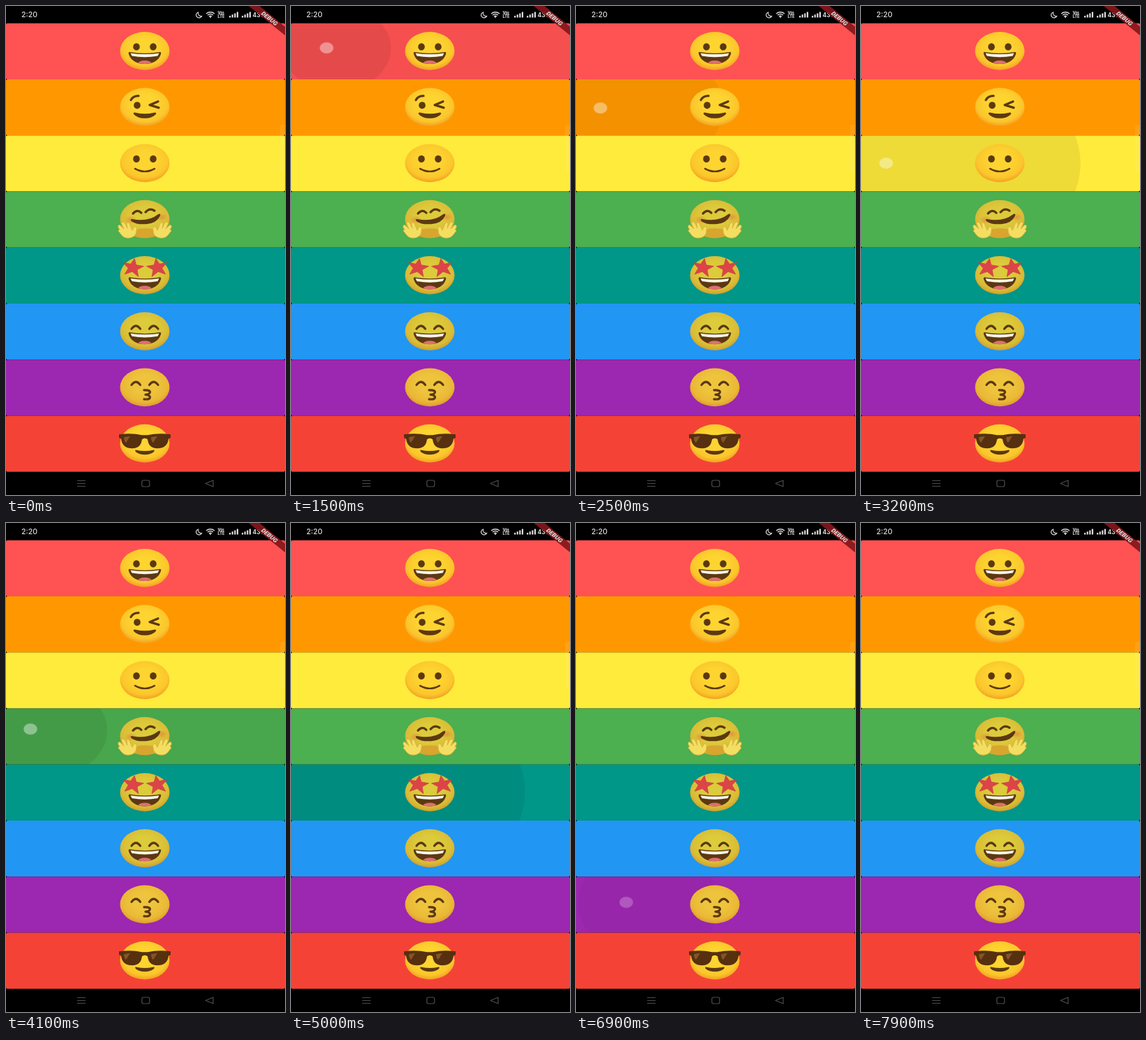
An HTML page that plays this animation: 400 by 700 pixels, repeating every 8000 ms.

```html
<!DOCTYPE html>
<html lang="en">
<head>
<meta charset="utf-8">
<title>Emoji buttons</title>
<style>
html, body { margin: 0; width: 100%; height: 100%; overflow: hidden; background: #000; }
svg { display: block; width: 100%; height: 100%; }
text { font-family: Inter, Roboto, sans-serif; fill: #dcdcdc; }
.line { fill: none; stroke: #5c3812; stroke-width: 3.2; stroke-linecap: round; stroke-linejoin: round; }
.dark { fill: #5c3812; }
.teeth { fill: #f8f4e6; }
.tongue { fill: #dd6f72; }
.nav { fill: none; stroke: #4c4c4c; stroke-width: 1.2; stroke-linejoin: round; }
</style>
</head>
<body>
<svg viewBox="0 0 400 700" preserveAspectRatio="none">
  <defs>
    <radialGradient id="warm" cx=".5" cy=".42" r=".58">
      <stop offset=".4" stop-color="#fdd430"/><stop offset=".8" stop-color="#fbc62c"/><stop offset="1" stop-color="#f2a023"/>
    </radialGradient>
    <radialGradient id="olive" cx=".5" cy=".42" r=".58">
      <stop offset=".4" stop-color="#dccb3b"/><stop offset=".8" stop-color="#dabc36"/><stop offset="1" stop-color="#d0a02c"/>
    </radialGradient>
    <radialGradient id="gold" cx=".5" cy=".42" r=".58">
      <stop offset=".4" stop-color="#eec43d"/><stop offset=".8" stop-color="#eab836"/><stop offset="1" stop-color="#de9c30"/>
    </radialGradient>
    <radialGradient id="blush">
      <stop offset="0" stop-color="#e5813f" stop-opacity=".7"/><stop offset="1" stop-color="#e5813f" stop-opacity="0"/>
    </radialGradient>
    <path id="eyes" class="line" d="M-19 -3.5Q-12.5 -12 -6.5 -3.5M6.5 -3.5Q12.5 -12 19 -3.5"/>
    <g id="dots" class="dark"><ellipse cx="-12" cy="-6" rx="4.8" ry="5.2"/><ellipse cx="12" cy="-6" rx="4.8" ry="5.2"/></g>
    <clipPath id="mouthClip"><path d="M-21 1.5Q0 5 21 1.5Q24 1 23 4.5C20 14 11 18.5 0 18.5S-20 14 -23 4.5Q-24 1 -21 1.5Z"/></clipPath>
    <g id="grin" clip-path="url(#mouthClip)">
      <rect class="dark" x="-25" width="50" height="20"/>
      <path class="teeth" d="M-20.5 3Q0 6 20.5 3L18.5 7Q0 10.5 -18.5 7Z"/>
      <ellipse class="tongue" cy="17.5" rx="9.5" ry="3.8"/>
    </g>
    <path id="star" fill="#dc4448" stroke="#c43a42" stroke-width=".6" stroke-linejoin="round"
      d="M0 -13L4 -4.5L15 -4.5L6.5 2L10 11.5L0 6L-10 11.5L-6.5 2L-15 -4.5L-4 -4.5Z"/>
    <path id="hand" fill="#f3de62" stroke="#d9b03a" stroke-width=".8" stroke-linejoin="round"
      d="M-38 12C-39 8 -36 7 -34 10L-30 14L-33 7C-34 3 -30 3 -28 7L-25 13L-26 7C-25 3 -22 5 -21 9L-18 16L-16 12C-13 9 -11 12 -12 16C-12 23 -17 27 -24 27C-31 27 -34 22 -36 19C-39 17 -38 15 -36 15Z"/>
  </defs>

  <g id="rows"></g>
  <g id="ink"></g>
  <g id="faces">
    <g data-skin="warm"><use href="#dots"/><use href="#grin"/></g>
    <g data-skin="warm">
      <path class="line" d="M-20 -10Q-17 -16 -9 -16"/>
      <ellipse class="dark" cx="-11" cy="-2.5" rx="4.8" ry="5"/>
      <path class="line" d="M19 -8L7 -3L20 1"/>
      <path class="dark" d="M-13 8Q0 11 13 8Q17 7 16 10Q11 16 0 16T-16 10Q-17 7 -13 8Z"/>
    </g>
    <g data-skin="warm"><use href="#dots"/><path class="line" style="stroke-width:2.4" d="M-14 8Q0 16 14 8"/></g>
    <g data-skin="olive">
      <ellipse cx="-20" cy="1" rx="9" ry="6" fill="url(#blush)"/><ellipse cx="24" cy="-3" rx="9" ry="6" fill="url(#blush)"/>
      <path class="line" d="M-17 -8Q-11 -15 -5 -9M1 -10Q7 -17 14 -12"/>
      <path class="dark" d="M-17 0Q5 4 19 -7Q23 -9 22 -5Q17 6 2 7Q-12 8 -19 3Q-22 -1 -17 0Z"/>
      <path fill="#d8a52e" d="M-15 15Q0 11 15 15L12 25Q0 28 -12 25Z"/>
      <use href="#hand"/><use href="#hand" transform="scale(-1 1)"/>
    </g>
    <g data-skin="olive">
      <use href="#grin" y="1.5"/>
      <use href="#star" transform="translate(-17 -11) rotate(10)"/><use href="#star" transform="translate(18 -11) rotate(-10)"/>
    </g>
    <g data-skin="olive"><use href="#eyes"/><use href="#grin"/></g>
    <g data-skin="gold"><use href="#eyes"/><path class="line" d="M-1 4C10 3 10 10 1 10.5C10 11 10 18 -1 17"/></g>
    <g data-skin="warm">
      <path fill="#56300f" d="M-37 -13Q-18 -15 -4 -12H4Q18 -15 37 -13V-8L34 -7C33 3 27 7 18 7C9 7 5 2 4 -6Q0 -9 -4 -6C-5 2 -9 7 -18 7C-27 7 -33 3 -34 -7L-37 -8Z"/>
      <path fill="#84552b" d="M-30 -9L-21 -10.5L-27 -1Q-30 -4 -30 -9ZM9 -9L18 -10.5L12 -1Q9 -4 9 -9Z"/>
      <path class="dark" d="M-12 9.5Q0 12 12 9.5Q15 9 13 12Q8 16 0 16T-13 12Q-15 9 -12 9.5Z"/>
    </g>
  </g>
  <ellipse id="touch" rx="9.6" ry="7.8" fill="#fff" stroke="#fff" stroke-opacity=".3" stroke-width="1.5"/>
  <path d="M400 170H396Q393 170 393 174V233Q393 237 396 237H400Z" fill="#fff" opacity=".08"/>

  <text x="22" y="16" font-size="10.6" font-weight="500">2:20</text>
  <g fill="#dcdcdc">
    <path d="M275.5 9A4.2 4 0 1 0 280.5 14.6A4.5 4.4 0 0 1 275.5 9Z" fill="none" stroke="#dcdcdc" stroke-width="1.2"/>
    <path d="M287 11Q293 6.5 299 11M289 13Q293 10 297 13M291 15Q293 13.5 295 15" fill="none" stroke="#dcdcdc" stroke-width="1.5"/>
    <circle cx="293" cy="16" r="1"/>
    <text x="303.5" y="12" font-size="5.6" font-weight="800">Vo)</text>
    <text x="303.5" y="17" font-size="5.6" font-weight="800">LTE</text>
    <path id="bars" d="M320 14h2.2v2.5h-2.2zM323.6 12.3h2.2v4.2h-2.2zM327.2 10.4h2.2v6.1h-2.2zM330.8 8.5h2.2v8h-2.2z"/>
    <use href="#bars" x="18"/>
    <text x="353.5" y="15.6" font-size="8.4" font-weight="700">43%</text>
  </g>
  <g transform="translate(400 0) scale(.92 .742) rotate(45)">
    <rect x="-40" y="28" width="80" height="12" fill="#85171c" opacity=".92"/>
    <text y="37.6" text-anchor="middle" font-size="10.2" font-weight="900" style="font-family:Roboto,sans-serif">DEBUG</text>
  </g>

  <path class="nav" d="M102 679.5H114M102 683.5H114M102 687.5H114"/>
  <rect class="nav" x="194.8" y="679" width="11" height="9" rx="2.2"/>
  <path class="nav" d="M286 683.5L297 679V688Z"/>
</svg>
<script>
const LOOP = 8000, PITCH = 80.25, TOP = 24.8, STRETCH = 1.27, TARGET = 212;
const colors = ['#ff5252', '#ff9800', '#ffeb3b', '#4caf50', '#009688', '#2196f3', '#9c27b0', '#f44336'];
// start = ripple start in ms, hold = time until release (0 for a quick tap), dot = touch opacity
const taps = [
  { start: 1400, hold: 170, x: 51, y: 60, dot: .4 },
  { start: 2450, hold: 0, x: 35, y: 146, dot: .4 },
  { start: 3110, hold: 0, x: 36, y: 225, dot: .4 },
  { start: 3970, hold: 180, x: 35, y: 295, dot: .4 },
  { start: 4900, hold: 0, x: 46, y: 380, dot: .25 },
  { start: 5852, hold: 0, x: 58, y: 459, dot: .23 },
  { start: 6860, hold: 0, x: 72, y: 543, dot: .23 },
  { start: 7530, hold: 0, x: 70, y: 625, dot: .25 }
];
const $ = id => document.getElementById(id);
const clamp = v => Math.min(1, Math.max(0, v));
const lerp = (a, b, k) => a + (b - a) * k;

function add(parent, tag, attrs) {
  const el = document.createElementNS('http://www.w3.org/2000/svg', tag);
  for (const k in attrs) el.setAttribute(k, attrs[k]);
  return parent.appendChild(el);
}

// cubic-bezier(.25, .1, .25, 1)
function ease(x) {
  let lo = 0, hi = 1;
  for (let i = 0; i < 20; i++) {
    const s = (lo + hi) / 2, r = 1 - s;
    if (.75 * r * r * s + .75 * r * s * s + s * s * s < x) lo = s; else hi = s;
  }
  const r = 1 - lo;
  return .3 * r * r * lo + 3 * r * lo * lo + lo ** 3;
}

[...$('faces').children].forEach((face, i) => {
  face.setAttribute('transform', `translate(199 ${64.4 + i * PITCH})`);
  const skin = add(face, 'ellipse', { rx: 35.5, ry: 27.3, fill: `url(#${face.dataset.skin})` });
  face.prepend(skin);
});

colors.forEach((fill, i) => {
  const box = { x: 0, y: TOP + i * PITCH, width: 400, height: PITCH, rx: 2.2, ry: 1.8 };
  add($('rows'), 'rect', { ...box, fill });
  add(add($('ink'), 'clipPath', { id: 'row' + i }), 'rect', box);
  const g = add($('ink'), 'g', { 'clip-path': `url(#row${i})` });
  taps[i].glow = add(g, 'rect', { ...box, opacity: 0 });
  taps[i].wave = add(g, 'ellipse', { opacity: 0 });
  taps[i].mid = box.y + box.height / 2;
});

function drawTap(tap, time) {
  const t = time - tap.start, after = t - tap.hold;
  const grown = clamp(Math.min(t, tap.hold) / 1000 + Math.max(0, after) / 225);
  const k = ease(grown), rx = TARGET * lerp(.3, 1, k);
  const fade = clamp(t / 75) * (1 - clamp((after - 225) / 150));
  tap.wave.setAttribute('cx', lerp(tap.x, 200, k));
  tap.wave.setAttribute('cy', lerp(tap.y, tap.mid, k));
  tap.wave.setAttribute('rx', rx);
  tap.wave.setAttribute('ry', rx / STRETCH);
  tap.wave.setAttribute('opacity', .068 * fade);
  const lit = tap.hold ? clamp(Math.min(t, tap.hold) / 200) * (1 - clamp(after / 200)) : 0;
  tap.glow.setAttribute('opacity', .075 * lit);
}

function draw(now) {
  const time = now % LOOP;
  taps.forEach(tap => drawTap(tap, time));
  const down = taps.find(p => time >= p.start - 100 && time < p.start + p.hold + 100);
  const touch = $('touch');
  touch.setAttribute('visibility', down ? 'visible' : 'hidden');
  if (!down) return;
  touch.setAttribute('transform', `translate(${down.x} ${down.y})`);
  touch.setAttribute('opacity', down.dot);
}

const begin = performance.now();
function tick() {
  draw(performance.now() - begin);
  requestAnimationFrame(tick);
}
tick();
</script>
</body>
</html>
```
